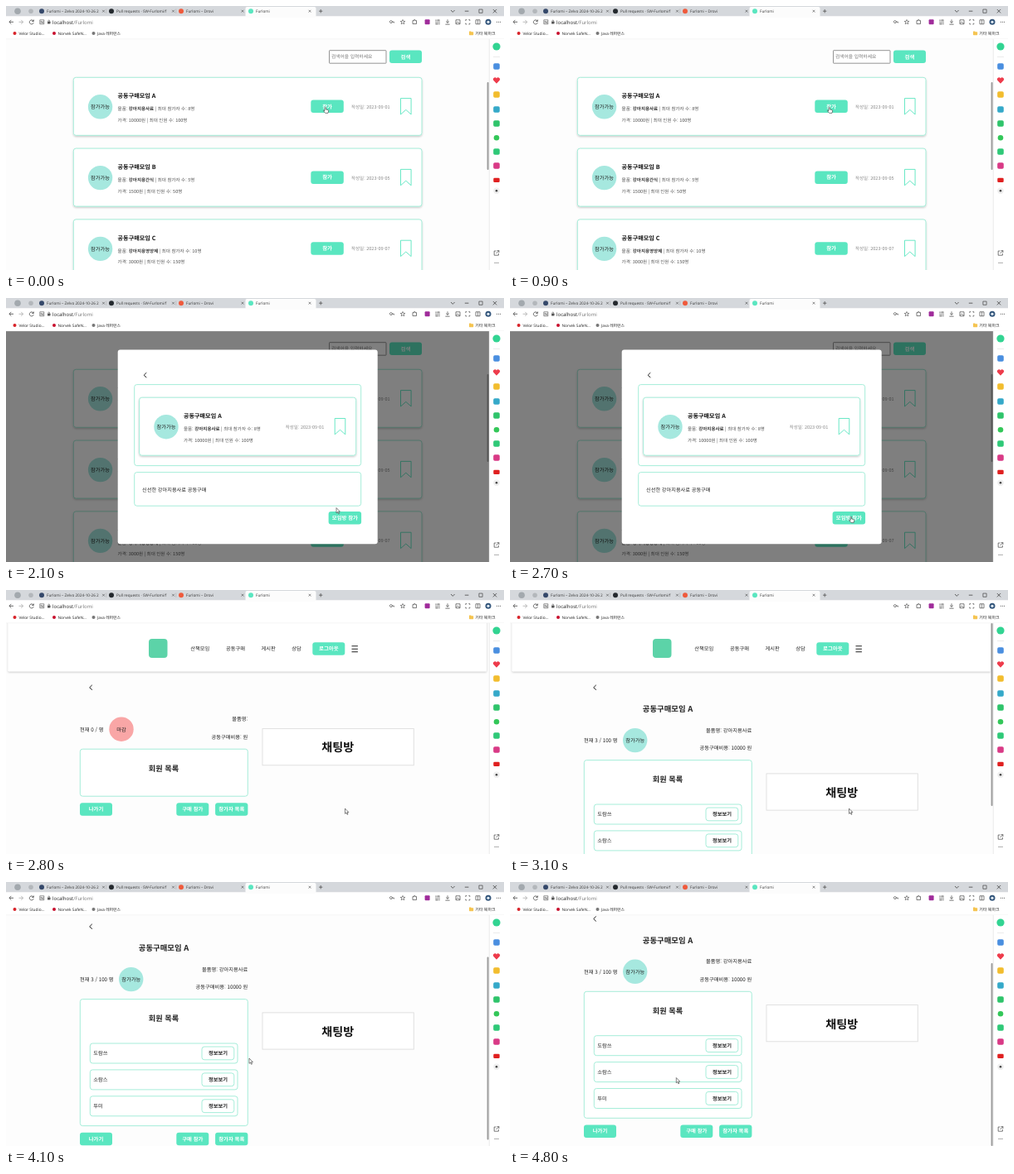
Animation of 600 by 319 pixels, one loop 5300 ms. Source, as an HTML page:

```html
<!DOCTYPE html>
<html lang="ko">
<head>
<meta charset="utf-8">
<style>
html, body { margin: 0; width: 100%; height: 100%; overflow: hidden; background: #fff; }
svg { display: block; width: 100vw; height: 100vh; }
text { font-family: "Noto Sans CJK KR", "Noto Sans CJK", "Noto Sans CJK JP", sans-serif; text-rendering: geometricPrecision; white-space: pre; }
.ui text { font-family: "Open Sans", "Noto Sans CJK KR", sans-serif; }
</style>
</head>
<body>
<svg id="stage" viewBox="0 0 600 319">
  <defs>
    <clipPath id="view"><rect y="40" width="582" height="279"/></clipPath>
    <filter id="shade" x="-10%" y="-20%" width="120%" height="150%">
      <feDropShadow dx="0" dy="1.2" stdDeviation="1.3" flood-color="#000" flood-opacity=".22"/>
    </filter>
  </defs>
  <rect width="600" height="319" fill="#fdfdfd"/>
  <g clip-path="url(#view)">
    <g id="list"></g>
    <g id="modal"></g>
    <g id="empty"></g>
    <g id="room"></g>
    <rect id="thumb" x="579.6" width="2" rx="1" fill="#9a9a9a"/>
  </g>
  <g id="chrome" class="ui"></g>
  <path id="arrow" d="M0 0V6.3L1.5 5L2.5 7.3L3.5 6.9L2.5 4.6H4.4Z" fill="#fff" stroke="#333" stroke-width=".6"/>
  <path id="hand" d="M0 0.6Q.7-.5 1.4.6V3L4 3.6Q4.7 3.8 4.6 4.6L4 7.4H.7L-1.6 4.6Q-1.4 3.7 0 4.6Z" fill="#fff" stroke="#333" stroke-width=".6"/>
</svg>
<script>
const $ = id => document.getElementById(id);
const TEAL = '#5ae6c0', MINT = '#9cebd5', PALE = '#a6e8df', INK = '#222';

// Shape helpers; text is centred vertically on cy
const text = (x, cy, size, str, {at = 'start', bold = 400, fill = INK} = {}) =>
  `<text x="${x}" y="${cy + size * .37}" font-size="${size}" text-anchor="${at}" font-weight="${bold}" fill="${fill}">${str}</text>`;
const rect = (x, y, w, h, fill, r = 0, more = '') =>
  `<rect x="${x}" y="${y}" width="${w}" height="${h}" rx="${r}" fill="${fill}" ${more}/>`;
const frame = (x, y, w, h, color = MINT, r = 3, more = '') =>
  rect(x, y, w, h, '#fff', r, `stroke="${color}" stroke-width=".9" ${more}`);
const dot = (x, y, r, fill) => `<circle cx="${x}" cy="${y}" r="${r}" fill="${fill}"/>`;
const line = (d, color = '#444', w = .8) =>
  `<path d="${d}" fill="none" stroke="${color}" stroke-width="${w}"/>`;
const mid = (x, cy, size, str, bold = 400, fill = INK) => text(x, cy, size, str, {at: 'middle', bold, fill});
const button = (x, y, str, w = 39.5) =>
  rect(x, y, w, 15.5, TEAL, 3) + mid(x + w / 2, y + 7.6, 6.4, str, 700, '#fff');
const badge = (x, y, str, fill = PALE) => dot(x, y, 14.7, fill) + mid(x, y, 6.25, str, 500);
const back = (x, y) => line(`M${x + 1.6} ${y - 3}L${x - 1.5} ${y}L${x + 1.6} ${y + 3}`, '#222', 1);

function card(x, y, w, [name, item, seats, price, people, date], join) {
  const grey = {fill: '#555'}, right = x + w;
  return frame(x, y, w, 70, MINT, 3, 'filter="url(#shade)"') +
    badge(x + 32.3, y + 35.5, '참가가능') +
    text(x + 53.3, y + 22.3, 7.1, `공동구매모임 ${name}`, {bold: 700, fill: '#111'}) +
    text(x + 53.3, y + 38, 5.5, `물품: <tspan font-weight="700" fill="#333">${item}</tspan> | 최대 참가자 수: ${seats}명`, grey) +
    text(x + 53.3, y + 51.5, 5.5, `가격: ${price}원 | 최대 인원 수: ${people}명`, grey) +
    (join ? button(x + 286, y + 27.3, '참가') : '') +
    text(right - 85, y + 35.5, 5.5, `작성일: ${date}`, {fill: '#8a8a8a'}) +
    line(`M${right - 25.5} ${y + 25.3}h12.6v19.4l-6.3-5.6l-6.3 5.6Z`, TEAL, .9);
}

const groups = [
  ['A', '강아지용사료', 8, 10000, 100, '2023-09-01'],
  ['B', '강아지용간식', 5, 1500, 50, '2023-09-05'],
  ['C', '강아지용영양제', 10, 3000, 150, '2023-09-07'],
];

$('list').innerHTML =
  frame(389.5, 53.7, 68.5, 15.5, '#8a8a8a', .5) +
  text(392, 61.3, 5.75, '검색어을 입력하세요', {fill: '#777'}) +
  button(462, 53.6, '검색', 39) +
  groups.map((g, i) => card(81.3, 86.3 + i * 85.8, 419.7, g, true)).join('');

$('modal').innerHTML =
  rect(0, 40, 582, 279, '#000', 0, 'opacity=".5"') +
  rect(134.7, 62.5, 313, 234.7, '#fff', 3) +
  back(167.7, 93.2) +
  frame(154.7, 104.6, 273, 98) +
  card(160.7, 120.2, 261, groups[0], false) +
  frame(154.7, 210.6, 273, 40.6) +
  text(164, 231.3, 6.2, '신선한 강아지용사료 공동구매') +
  button(388.6, 257.9, '모임방 참가');

const header =
  rect(2.5, 30, 576.5, 68.3, '#fff', 1, 'filter="url(#shade)"') +
  rect(172, 59, 22.5, 23, '#5cd3a8', 4) +
  [[222.3, '산책모임'], [265, '공동구매'], [307.6, '게시판'], [344.3, '상담']]
    .map(([x, s]) => text(x, 71, 6.25, s)).join('') +
  button(369.3, 63.2, '로그아웃', 39) +
  line('M416.5 67.7h7.4M416.5 71.2h7.4M416.5 74.7h7.4', '#222', 1.1);

// Chat room page, with the rows that depend on the loaded data
function room({count, status, item, cost, members, dy, title}) {
  const right = {at: 'end'}, top = 192.2 + dy, end = top + (members.length ? 153 : 57);
  const row = (name, i) => {
    const y = top + 53.4 + i * 31.9;
    return frame(101.3, y, 177.7, 24) + text(105.3, y + 12, 6.25, name) +
      frame(236, y + 4, 38.8, 15.8) + mid(255.4, y + 11.9, 6.25, '정보보기', 700);
  };
  return header + back(102.2, 117.8) +
    (title ? mid(190, 143.8, 9.4, title, 700) : '') +
    text(89, 168.5 + dy, 6.25, count) + status +
    text(291.3, 156 + dy, 6.25, `물품명: ${item}`.trim(), right) +
    text(291.3, 177.6 + dy, 6.25, `공동구매비용: ${cost}원`, right) +
    frame(89.3, top, 202, end - top) +
    mid(190, top + 23.3, 9.2, '회원 목록', 700) +
    members.map(row).join('') +
    button(89, end + 8.1, '나가기', 39) + button(205.3, end + 8.1, '구매 참가', 39) +
    button(252.1, end + 8.1, '참가자 목록', 39.3) +
    frame(309, 167.6 + (members.length ? 54.3 : 0), 182.3, 44.2, '#ddd', 0) +
    mid(399.8, 190 + (members.length ? 54.6 : 0), 14.1, '채팅방', 700, '#111');
}

$('empty').innerHTML = room({
  count: '현재 0 / 명', status: badge(139, 168.2, '마감', '#f9a6a6'),
  item: '', cost: '', members: [], dy: 0,
});
$('room').innerHTML = room({
  count: '현재 3 / 100 명', status: badge(150.7, 181.6, '참가가능'),
  item: '강아지용사료', cost: '10000 ', members: ['도람쓰', '소람스', '뚜미'], dy: 13.4,
  title: '공동구매모임 A',
});

// Browser window around the page
const tab = (x, color, str) => dot(x + 7, 6.2, 3, color) + text(x + 13, 6.2, 4.7, str, {fill: '#333'});
const cross = (x, y, r, w = .6) => line(`M${x - r} ${y - r}l${2 * r} ${2 * r}m0 ${-2 * r}l${-2 * r} ${2 * r}`, '#444', w);
const box = (x, y, s) => line(`M${x - s} ${y - s}h${2 * s}v${2 * s}h${-2 * s}Z`, '#444', .7);
const dots = (x, y) => [-2, 0, 2].map(d => dot(x + d, y, .55, '#444')).join('');
const sideIcons = [
  [73, '#4a8fe0'], [107, '#f2bd2e'], [125, '#35a9c9'], [142, '#2fc46b'],
  [176, '#2fc978'], [193, '#d93a86'],
];

$('chrome').innerHTML =
  rect(0, 0, 600, 12.5, '#d5d8dc') +
  rect(0, 12.5, 600, 27.5, '#fff') +
  rect(288.5, 1, 85, 13, '#fcfcfc', 2) +
  dot(14, 6.2, 3.8, '#a3a9ae') + dot(30, 6.2, 2.8, '#b3b7bb') +
  tab(36, '#35486a', 'Furlomi – Zelvo 2024-10-26 2') +
  tab(120, '#24292e', 'Pull requests · SW-Furlomi/f') +
  tab(204, '#ef5a3c', 'Furlomi – Drovi') +
  tab(288, TEAL, 'Furlomi') +
  [117.5, 201.5, 285, 366].map(x => cross(x, 6.2, 1.4)).join('') +
  line('M120.8 3.5v5.5M204.8 3.5v5.5', '#aaa', .5) +
  line('M377 6.2h4.4M379.2 4v4.4', '#444', .7) +
  line('M536 5l2.3 2.4l2.3-2.4M552.8 6.2h4.6', '#444', .8) + box(572, 6.2, 2.1) + cross(589, 6.2, 2.2, .8) +

  line('M9 19.3H4m2.3-2.4l-2.4 2.4l2.4 2.4', '#444') +
  line('M15.5 19.3h5m-2.3-2.4l2.4 2.4l-2.4 2.4', '#aaa') +
  line('M33 18.2a2.5 2.5 0 1 0 .2 2M33.3 16.5v2h-2', '#444') +
  line('M40.8 16.8h5v5h-5ZM42.2 20.8v-2.6l2.2 2.6v-2.6', '#444', .6) +
  rect(50, 18.8, 3.4, 2.8, '#555', .4) + line('M50.8 19v-1a.9 .9 0 0 1 1.8 0v1', '#555', .6) +
  text(56, 19.3, 6, 'localhost<tspan fill="#777">/Furlomi</tspan>') +
  line('M465 20a1.4 1.4 0 1 1-2.3-1.8a1.4 1.4 0 0 1 2.3 1.8M465 19.2h2.4v1.4', '#444', .7) +
  line('M478 16.5l.8 1.9l2 .1l-1.6 1.3l.6 2l-1.8-1.1l-1.8 1.1l.6-2l-1.6-1.3l2-.1Z', '#444', .6) +
  line('M490 17.6h1.6v-.9h1.3v.9h1.6v4h-4.5Z', '#444', .7) +
  rect(504.6, 16.3, 6, 6, '#a02c9b', 1) +
  line('M517 17.2h6M517 19.4h6M517 21.6h6M521 16.2v2M519 20.6v2', '#444', .6) +
  line('M532 16.3v4m-1.9-1.7l1.9 1.8l1.9-1.8M529.4 22.2h5.2', '#444', .7) +
  box(544.5, 19.3, 2.5) + line('M542.2 21l1.8-1.8l3 2.2', '#444', .6) +
  line('M553.8 18v-1.4h1.4m2.2 0h1.4V18m0 2.6V22h-1.4m-2.2 0h-1.4v-1.4', '#444', .7) +
  box(568.5, 19.3, 2.5) + line('M568.5 16.8v5', '#444', .6) +
  dot(581, 19.3, 3.5, '#35577c') + dot(581, 19.3, 1.6, '#e5edf4') +
  dots(593.5, 19.3) +

  dot(10.5, 33, 2, '#d8232a') + text(15.5, 33, 4.8, 'Velor Studio...') +
  dot(58, 33, 2, '#c8102e') + text(62.5, 33, 4.8, 'Norvek SafeN...') +
  dot(105.5, 33, 2, '#777') + text(110, 33, 4.8, 'Java 레퍼런스') +
  rect(558, 31.2, 5.2, 4, '#f5c451', .6) + rect(558, 30.5, 2.5, 2, '#f5c451', .4) +
  text(565.3, 33, 5, '기타 북마크') +
  line('M0 39.8H600', '#ececec', .5) +

  rect(582, 40, 18, 279, '#fff') + line('M582.3 40V319', '#dedede', .6) +
  dot(591, 49, 4.6, '#32d492') + line('M587 61.5h8', '#ddd', .6) +
  sideIcons.map(([y, c]) => rect(587.2, y - 3.7, 7.6, 7.4, c, 1.8)).join('') +
  `<path d="M591 93.7l-3.8-3.9a2.2 2.2 0 0 1 3.8-2.4a2.2 2.2 0 0 1 3.8 2.4Z" fill="#ee3c4c"/>` +
  dot(591, 159.3, 3.3, '#34c759') + rect(587.3, 207.8, 7.4, 5.2, '#e02020', 1.3) +
  dot(591, 223.3, 3.7, '#eee') + dot(591, 223.3, 1.3, '#444') +
  line('M590.5 296h-2.3v5.2h5.2v-2.3M590.5 299l3.4-3.4m-2.4 0h2.4v2.4', '#444', .7) +
  dots(591, 310.3);

// Cursor stops: time, x, y
const stops = [
  [0, 382.3, 122], [1400, 382.3, 122], [2100, 398, 253.5], [2500, 398, 253.5],
  [2600, 408.5, 264], [3500, 408.5, 264], [3700, 293, 213], [4600, 293, 213], [4800, 200.3, 236.5], [5300, 200.3, 236.5],
];
const scrolls = [0, 8.7, 38, 64, 73.3];
const ease = p => p * p * (3 - 2 * p);
const show = (id, on) => $(id).style.display = on ? '' : 'none';

function draw(t) {
  const inRoom = t >= 2800, loaded = t >= 2900;
  show('list', !inRoom);
  show('modal', t >= 1000 && !inRoom);
  show('empty', inRoom && !loaded);
  show('room', loaded);

  const scroll = scrolls[Math.max(0, Math.min(4, (t - 3800) / 100))];
  $('room').setAttribute('transform', `translate(0 ${-scroll})`);
  show('thumb', !inRoom || loaded);
  $('thumb').setAttribute('y', loaded ? 40 + scroll * .79 : 92);
  $('thumb').setAttribute('height', loaded ? 221 : 106);
  $('thumb').setAttribute('fill', t >= 1000 && !inRoom ? '#555' : '#9a9a9a');

  const i = stops.findIndex(s => s[0] > t);
  const [t0, x0, y0] = stops[i - 1], [t1, x1, y1] = stops[i];
  const p = ease((t - t0) / (t1 - t0));
  const x = x0 + (x1 - x0) * p, y = y0 + (y1 - y0) * p;
  const hand = t < 1000 || (t >= 2600 && !inRoom);
  show('hand', hand);
  show('arrow', !hand);
  $(hand ? 'hand' : 'arrow').setAttribute('transform', `translate(${x + (hand ? 1.7 : 0)} ${y})`);
}

let start, last = -1;
function tick(now) {
  start ??= now;
  const t = Math.floor((now - start) % 5300 / 100) * 100;
  if (t !== last) draw(last = t);
  requestAnimationFrame(tick);
}
draw(0);
requestAnimationFrame(tick);
</script>
</body>
</html>
```
